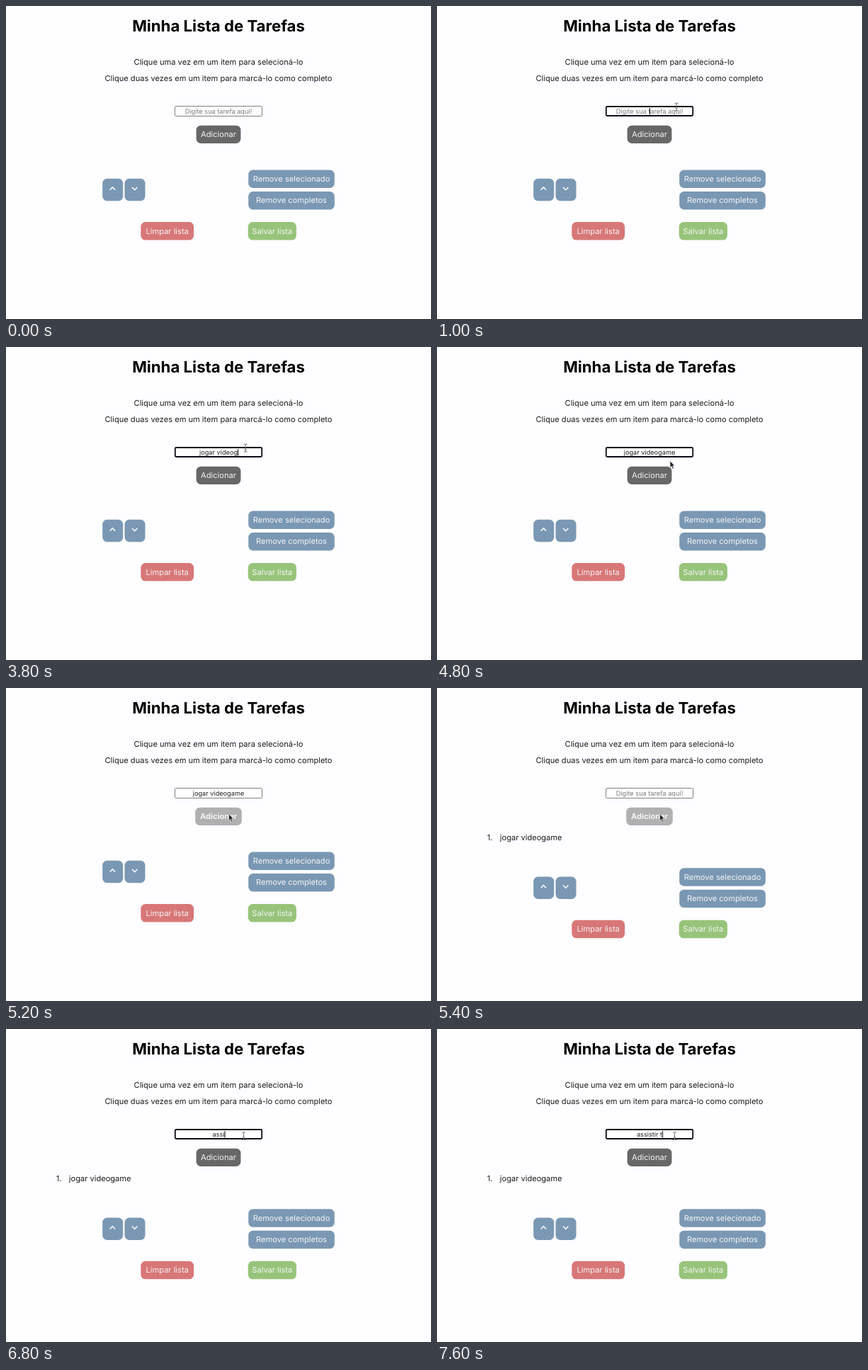
An HTML page that plays this animation: 600 by 442 pixels, repeating every 8 s.

```html
<!DOCTYPE html>
<html lang="pt-BR">
<head>
<meta charset="utf-8">
<title>Lista de Tarefas</title>
<style>
  html, body { margin: 0; width: 100%; height: 100%; overflow: hidden; background: #fefdff; }
  svg { display: block; width: 100%; height: 100%; }
  text { font: 11.1px Inter, sans-serif; fill: #1c1c1c; white-space: pre; text-rendering: geometricPrecision; }
  .mid { text-anchor: middle; }
  .btn { fill: #f4f4f7; text-anchor: middle; }
  #title { font-size: 22.2px; font-weight: 700; fill: #000; }
  #value { font-size: 9.2px; }
</style>
</head>
<body>
<svg id="stage" viewBox="0 0 600 442">
  <text id="title" class="mid" x="300" y="36">Minha Lista de Tarefas</text>
  <text class="mid" x="300" y="83.2">Clique uma vez em um item para selecioná-lo</text>
  <text class="mid" x="300" y="106.2">Clique duas vezes em um item para marcá-lo como completo</text>

  <rect id="field" fill="#fff"/>
  <text id="value" class="mid" x="300" y="152"></text>
  <path id="caret" stroke="#111" stroke-width="1"/>

  <rect id="add" y="168.7" height="25.3" rx="6.5"/>
  <text id="addText" class="btn" x="300" y="185.2">Adicionar</text>

  <g id="item">
    <text x="70.7" y="214.5">1.</text>
    <text x="88.8" y="214.5">jogar videogame</text>
  </g>
  <g id="controls"></g>

  <path id="beam" d="M-2.5-5.5Q0-5.5 0-4Q0-5.5 2.5-5.5M0-4V4M-2.5 5.5Q0 5.5 0 4Q0 5.5 2.5 5.5M-1.5 2H1.5"
        fill="none" stroke="#777" stroke-width="1.1"/>
  <path id="arrow" d="M0 0V9.2L2.1 7.3L3.7 10.9L5.3 10.2L3.7 6.7H6.6Z"
        fill="#222" stroke="#eee" stroke-width=".6"/>
</svg>
<script>
const $ = id => document.getElementById(id);
const LOOP = 8000, TICK = 200;
const BLUE = '#7a98b3';

function set(el, attrs) {
  for (const k in attrs) el.setAttribute(k, attrs[k]);
}
function show(el, on) {
  el.style.display = on ? '' : 'none';
}
function button(x, y, w, h, color, label) {
  const inner = label
    ? `<text class="btn" x="${x + w / 2}" y="${y + 16.4}">${label}</text>`
    : '';
  return `<rect x="${x}" y="${y}" width="${w}" height="${h}" rx="6.5" fill="${color}"/>${inner}`;
}
function chevron(x, y, rise) {
  return `<path d="M${x - 3.7} ${y + rise}L${x} ${y - rise}L${x + 3.7} ${y + rise}" fill="none" stroke="#fff" stroke-width="1.5"/>`;
}

$('controls').innerHTML =
  button(136.2, 243.8, 29, 31.4, BLUE) + chevron(150.4, 257.8, 1.9) +
  button(167.5, 243.8, 29, 31.4, BLUE) + chevron(181.7, 257.8, -1.9) +
  button(342.2, 231.5, 121.6, 25.5, BLUE, 'Remove selecionado') +
  button(342.2, 262, 121.6, 25.5, BLUE, 'Remove completos') +
  button(190.3, 305.1, 74.8, 25.5, '#d87777', 'Limpar lista') +
  button(341.7, 305.1, 68.2, 25.5, '#97c47a', 'Salvar lista');

// [start ms, letters typed]
const typing = [
  { text: 'jogar videogame', keys: [[1400, 1], [1600, 2], [1800, 3], [2000, 4], [2200, 6], [2400, 7],
    [2800, 8], [3000, 9], [3200, 10], [3400, 11], [3800, 12], [4000, 13], [4200, 14], [4400, 15]], end: 5400 },
  { text: 'assistir tv', keys: [[6400, 1], [6600, 2], [6800, 4], [7000, 6], [7200, 8], [7400, 9], [7600, 10]], end: LOOP }
];
// [start ms, pointer, x, y]
const pointer = [
  [0, '', 0, 0], [800, 'beam', 338, 142.5], [4800, 'arrow', 329, 161], [5000, 'arrow', 314.5, 178],
  [5600, 'beam', 335.5, 151]
];

const last = (list, t) => list.filter(k => k[0] <= t).pop();

function typed(t) {
  const { text, keys } = typing.find(entry => t < entry.end);
  const key = last(keys, t);
  return key ? text.slice(0, key[1]) : '';
}

function draw(ms) {
  const t = Math.floor(ms / TICK) * TICK;
  const text = typed(t);
  const focus = (t >= 1000 && t < 5200) || t >= 5800;
  const hover = t >= 5000 && t < 5600;
  const added = t >= 5400;

  set($('field'), focus
    ? { x: 238.8, y: 142, width: 122.4, height: 13, rx: 1.5, stroke: '#120c18', 'stroke-width': 1.8 }
    : { x: 238.5, y: 141.5, width: 123, height: 14, rx: 1, stroke: '#808080', 'stroke-width': 1 });

  const value = $('value');
  value.textContent = text || 'Digite sua tarefa aqui!';
  value.style.fill = text ? '#222' : '#7b7b7b';

  const idle = t >= 4400 && t < 5200;
  show($('caret'), focus && !(idle && t % 1000 >= 600));
  const x = 300 + (text ? value.getComputedTextLength() / 2 + .5 : .5);
  set($('caret'), { d: `M${x} 144V153.5` });

  set($('add'), hover
    ? { x: 267.2, width: 65.6, fill: '#b0b0b0' }
    : { x: 268.6, width: 62.8, fill: '#676767' });
  $('addText').style.fontWeight = hover ? 700 : 400;

  show($('item'), added);
  set($('controls'), { transform: `translate(0 ${added ? 22.7 : 0})` });

  const [, kind, px, py] = last(pointer, t);
  for (const id of ['beam', 'arrow']) {
    show($(id), id === kind);
    set($(id), { transform: `translate(${px} ${py})` });
  }
}

const start = performance.now();
function loop() {
  draw((performance.now() - start) % LOOP);
  requestAnimationFrame(loop);
}
loop();
</script>
</body>
</html>
```
